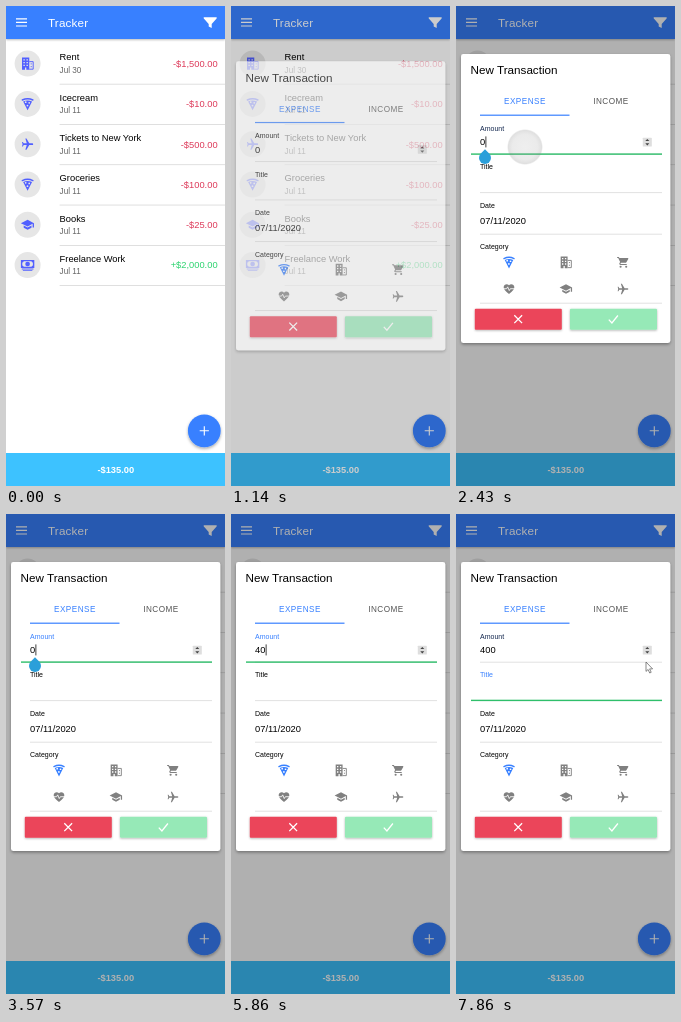
An HTML page for the animation above (8 s loop, 219 by 480 pixels).

```html
<!DOCTYPE html>
<html lang="en">
<head>
<meta charset="utf-8">
<title>Tracker</title>
<style>
  html, body { margin: 0; width: 100%; height: 100%; overflow: hidden; background: #fff; }
  svg { display: block; width: 100vw; height: 100vh; }
  text { font-family: "Liberation Sans", Arial, sans-serif; font-size: 9.34px; }
  .title { font-size: 11.68px; }
  .date { font-size: 8.18px; fill: #666; }
  .tab { font-size: 8.18px; letter-spacing: .49px; text-anchor: middle; }
  .label { font-size: 7px; }
</style>
</head>
<body>
<svg id="stage" viewBox="0 0 219 480">
  <defs>
    <filter id="soft" x="-30%" y="-30%" width="160%" height="170%">
      <feDropShadow dx="0" dy="1.5" stdDeviation="1.7" flood-opacity=".35"/>
    </filter>
    <filter id="lift" x="-5%" y="-30%" width="110%" height="180%">
      <feDropShadow dx="0" dy=".8" stdDeviation=".8" flood-opacity=".3"/>
    </filter>
    <radialGradient id="finger">
      <stop offset="0" stop-color="#999" stop-opacity=".16"/>
      <stop offset=".7" stop-color="#999" stop-opacity=".2"/>
      <stop offset=".92" stop-color="#888" stop-opacity=".26"/>
      <stop offset="1" stop-color="#888" stop-opacity="0"/>
    </radialGradient>
  </defs>

  <rect width="219" height="480" fill="#fff"/>
  <g id="list"></g>

  <g filter="url(#lift)"><rect width="219" height="33" fill="#3880ff"/></g>
  <path d="M10 12.8h11M10 16.4h11M10 20h11" stroke="#fff" stroke-width="1.2"/>
  <text class="title" x="42" y="20.6" fill="#fff" letter-spacing=".15">Tracker</text>
  <path d="M198 11.3h12.4q.8.4.2 1.2l-4.9 5.4v4l-3-1.4v-2.6l-4.9-5.4q-.6-.8.2-1.2z" fill="#fff"/>

  <circle cx="198.3" cy="424.8" r="16.4" fill="#3880ff" filter="url(#soft)"/>
  <path d="M193.7 424.8h9.2M198.3 420.2v9.2" stroke="#fff" stroke-width="1.1"/>
  <rect y="447" width="219" height="33" fill="#3dc2ff"/>
  <text x="109.8" y="467" fill="#fff" font-weight="700" text-anchor="middle">-$135.00</text>

  <rect id="shade" width="219" height="480"/>

  <g id="modal">
    <rect x="5" y="48" width="209.3" height="289" rx="2.4" fill="#fff" filter="url(#soft)"/>
    <text class="title" x="14.6" y="68.4">New Transaction</text>
    <text class="tab" x="69" y="98.4" fill="#3880ff">EXPENSE</text>
    <text class="tab" x="155" y="98.4" fill="#555">INCOME</text>
    <rect x="24" y="108.6" width="89.5" height="1.2" fill="#3880ff"/>
    <path d="M24 148.2H206M24 186.6H206M24 228.2H206M24 297.2H206" stroke="#d4d4d4" stroke-width=".7"/>

    <text class="label" id="amountLabel" x="24" y="124.9">Amount</text>
    <text id="amount" x="24" y="139.4"></text>
    <rect x="186.8" y="131.7" width="9" height="8.8" rx=".6" fill="#dedede"/>
    <path d="M189.3 135.1l2-2.2 2 2.2zM189.3 137.2l2 2.2 2-2.2z" fill="#444"/>
    <text class="label" id="titleLabel" x="24" y="163.2">Title</text>
    <text class="label" x="24" y="201.6">Date</text>
    <text x="24" y="217.6">07/11/2020</text>
    <text class="label" x="24" y="243.3">Category</text>
    <g id="kinds"></g>

    <g filter="url(#lift)">
      <rect x="18.8" y="302.8" width="87" height="21" rx="1" fill="#eb445a"/>
      <rect x="114" y="302.8" width="87" height="21" rx="1" fill="#96e9b7"/>
    </g>
    <path d="M58.3 309.3l7.8 7.8M66.1 309.3l-7.8 7.8M152.8 313.6l3.1 3.3 6-7.4" fill="none" stroke="#fff" stroke-width="1.3"/>

    <rect id="focus" x="15" width="191" height="1.4" fill="#2fbf6b"/>
    <rect id="caret" width=".8" height="11" fill="#111"/>
    <path id="handle" d="M29 143.2l4.4 4.6a6 6 0 1 1-8.8 0z" fill="#2b9fda"/>
  </g>

  <circle id="touch" r="18" fill="url(#finger)"/>
  <path id="pointer" d="M190 148v9.4l2.1-1.9 1.6 3.5 1.5-.7-1.6-3.4h3z" fill="#fff" stroke="#555" stroke-width=".7"/>
</svg>

<script>
const $ = id => document.getElementById(id);

// Icons on a 24 unit grid
const icons = {
  office: '<path fill-rule="evenodd" d="M2 1h13v22H2zM4.5 4v2.5H7V4zM10 4v2.5h2.5V4zM4.5 9v2.5H7V9zM10 9v2.5h2.5V9zM4.5 14v2.5H7V14zM10 14v2.5h2.5V14zM7.3 19v4h2.4v-4z"/>' +
    '<path fill="none" stroke="currentColor" stroke-width="1.7" d="M15 8.5h7V22h-7M17.5 12.5h2M17.5 17.5h2"/>',
  pizza: '<path fill="none" stroke="currentColor" stroke-width="2.6" stroke-linecap="round" d="M2.5 5Q12 .2 21.5 5"/>' +
    '<path fill-rule="evenodd" d="M4 7.6Q12 3.8 20 7.6L12 23.4zM7 9a1.6 1.6 0 1 0 3.2 0a1.6 1.6 0 1 0-3.2 0M13.3 10a1.6 1.6 0 1 0 3.2 0a1.6 1.6 0 1 0-3.2 0M10.2 15a1.6 1.6 0 1 0 3.2 0a1.6 1.6 0 1 0-3.2 0"/>',
  plane: '<path transform="rotate(90 12 12)" d="M22 16v-2l-8.5-5V3.5a1.5 1.5 0 0 0-3 0V9L2 14v2l8.5-2.5V19L8 20.5V22l4-1 4 1v-1.5L13.5 19v-5.5z"/>',
  school: '<path d="M5 13.2v4l7 3.8 7-3.8v-4L12 17zM12 3L0 9l12 6.2 9-4.9V17h2.4V9z"/>',
  cash: '<path fill-rule="evenodd" d="M0 3h24v14H0zM2.5 7.5v5a3 3 0 0 1 2.5 2.3h14a3 3 0 0 1 2.5-2.3v-5A3 3 0 0 1 19 5.2H5a3 3 0 0 1-2.5 2.3z"/>' +
    '<circle cx="12" cy="10" r="4.2"/><path d="M1.5 18.3h21v1.4h-21zM3.5 20.8h17v1.4h-17z"/>',
  cart: '<circle cx="7.5" cy="20.3" r="2"/><circle cx="18" cy="20.3" r="2"/>' +
    '<path d="M1 2h3.3l1 2H21q1.5.2.9 1.6l-3.6 6.4q-.6 1-1.7 1H8.1l-1 2H19v2H7q-3-.5-1.8-3l1.4-2.4L3 4H1z"/>',
  heart: '<path d="M12 21.6C5 15.4 2 12.3 2 8.5C2 3 9 1 12 5.1C15 1 22 3 22 8.5C22 12.3 19 15.4 12 21.6z"/>' +
    '<path fill="none" stroke="#fff" stroke-width="1.6" d="M1 11.5h6.5l2-3.5 3 7 2-3.5H23"/>'
};

const icon = (name, x, y, size, color) =>
  `<g transform="translate(${x} ${y}) scale(${size / 24}) translate(-12 -12)" fill="${color}" color="${color}">${icons[name]}</g>`;

const rows = [
  ['office', 'Rent', 'Jul 30', '-$1,500.00'],
  ['pizza', 'Icecream', 'Jul 11', '-$10.00'],
  ['plane', 'Tickets to New York', 'Jul 11', '-$500.00'],
  ['pizza', 'Groceries', 'Jul 11', '-$100.00'],
  ['school', 'Books', 'Jul 11', '-$25.00'],
  ['cash', 'Freelance Work', 'Jul 11', '+$2,000.00']
];

$('list').innerHTML = rows.map(([kind, name, date, sum], i) => {
  const y = 57.6 + i * 40.3;
  const color = sum[0] === '+' ? '#2dd36f' : '#dd3a5a';
  return `<circle cx="21.6" cy="${y}" r="13" fill="#e6e6e6"/>${icon(kind, 21.6, y, 13.4, '#5260ff')}
    <text x="53.6" y="${y - 3.2}">${name}</text>
    <text class="date" x="53.6" y="${y + 9.3}">${date}</text>
    <text x="211.6" y="${y + 3.3}" text-anchor="end" fill="${color}">${sum}</text>
    <rect x="53.6" y="${y + 20.2}" width="166" height=".7" fill="#d2d2d2"/>`;
}).join('');

$('kinds').innerHTML = ['pizza', 'office', 'cart', 'heart', 'school', 'plane'].map((kind, i) =>
  icon(kind, 53 + i % 3 * 57, i < 3 ? 256.3 : 283, 12.8, i ? '#808080' : '#3880ff')).join('');

const LOOP = 8000, STEP = 1000 / 7;
const show = (el, on) => el.setAttribute('visibility', on ? 'visible' : 'hidden');
const set = (el, attrs) => { for (const k in attrs) el.setAttribute(k, attrs[k]); };
const within = (t, ...spans) => spans.some(([a, b]) => t >= a && t < b);

// Last value whose start time has passed
const latest = (t, keys) => keys.filter(([start]) => t >= start).pop()[1];

const amountKeys = [[0, '0'], [4550, ''], [5120, '4'], [5550, '40'], [5980, '400']];
const amountColors = [[0, '#000'], [2400, '#14284f'], [2550, '#3880ff'], [6700, '#14284f']];

function draw(t) {
  const x = Math.min(1, Math.max(0, (t - 1060) / 280));
  const enter = 1 - (1 - x) ** 3;
  $('shade').setAttribute('opacity', .31 * enter);
  set($('modal'), { opacity: enter, transform: `translate(0 ${21 * (1 - enter)})` });
  show($('modal'), enter > 0);

  const amount = latest(t, amountKeys);
  const onTitle = t >= 6700;
  $('amount').textContent = amount;
  $('amountLabel').setAttribute('fill', latest(t, amountColors));
  $('titleLabel').setAttribute('fill', onTitle ? '#3880ff' : '#000');

  show($('focus'), t >= 2400);
  $('focus').setAttribute('y', onTitle ? 185.7 : 147.4);
  show($('handle'), within(t, [2400, 4550]));
  show($('caret'), within(t, [2400, 2840], [3410, 3980], [4550, 4980], [5120, 6270], [6700, 6980], [7410, 7840]));
  set($('caret'), onTitle ? { x: 24, y: 168.8 } : { x: 24.3 + amount.length * 5.2, y: 130.4 });

  const onButton = t < 1000;
  set($('touch'), { cx: onButton ? 198.3 : 69, cy: onButton ? 424.8 : 141 });
  show($('touch'), within(t, [420, 850], [2280, 2560]));
  show($('pointer'), t >= 7840);
}

function tick(now) {
  const t = now % LOOP;
  draw(Math.floor((t + 4) / STEP) % 56 * STEP);
  requestAnimationFrame(tick);
}
draw(0);
requestAnimationFrame(tick);
</script>
</body>
</html>
```
